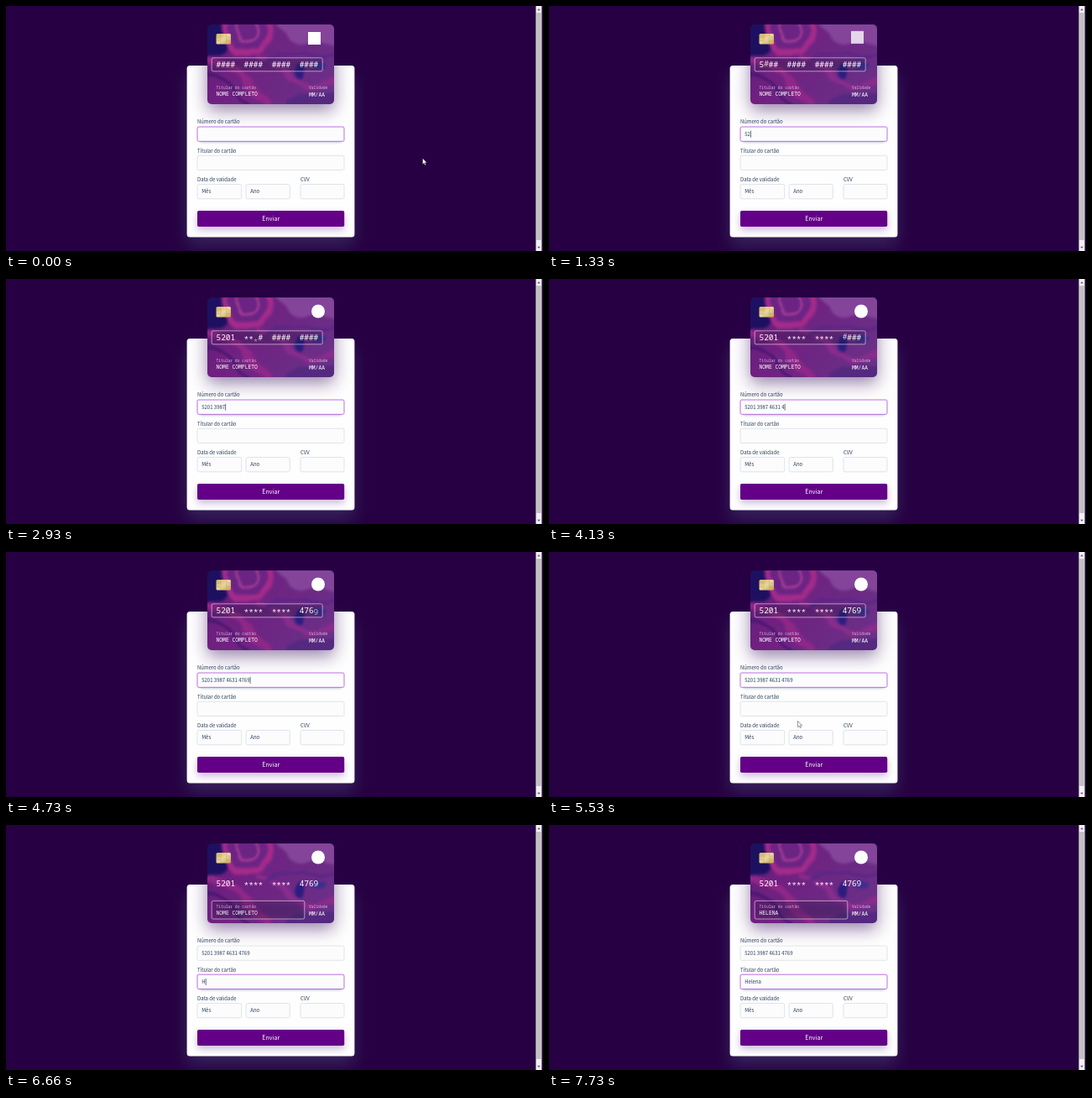
Animation of 640 by 292 pixels, one loop 8000 ms. Source, as an HTML page:

```html
<!DOCTYPE html>
<html lang="pt">
<head>
<meta charset="utf-8">
<title>Cartão</title>
<style>
html, body { margin: 0; width: 100%; height: 100%; overflow: hidden; background: #260042; }
svg { display: block; width: 100%; height: 100%; }
text { white-space: pre; }
.form { font: 6px "Noto Sans CJK JP", "Noto Sans CJK SC", "Noto Sans", sans-serif; fill: #273c5a; }
.mono { font: 500 6.34px "Noto Sans Mono", "DejaVu Sans Mono", monospace; fill: #fff; }
.mono .num { font-size: 9.5px; }
.mono .small { font-size: 4.66px; font-weight: 400; fill: #e9d9f2; fill-opacity: .8; }
.field { fill: #fcfcfd; stroke: #d9dde5; stroke-width: .8; }
</style>
</head>
<body>
<svg viewBox="0 0 640 292" xmlns="http://www.w3.org/2000/svg">
  <defs>
    <clipPath id="cardClip"><rect x="240" y="22" width="151" height="95" rx="5"/></clipPath>
    <clipPath id="formClip"><rect x="215.6" y="71" width="199.8" height="204.5" rx="3.5"/></clipPath>
    <clipPath id="focusClip"><rect id="focusArea" rx="1.8"/></clipPath>
    <linearGradient id="base" x2="1" y2=".4">
      <stop offset="0" stop-color="#4a1a70"/><stop offset=".4" stop-color="#702080"/>
      <stop offset="1" stop-color="#6a3088"/>
    </linearGradient>
    <linearGradient id="gold" x2="1" y2="1">
      <stop offset="0" stop-color="#cfb168"/><stop offset=".5" stop-color="#e8d79c"/><stop offset="1" stop-color="#c4a257"/>
    </linearGradient>
    <filter id="marble" filterUnits="userSpaceOnUse" x="220" y="4" width="190" height="132" color-interpolation-filters="sRGB">
      <feGaussianBlur in="SourceGraphic" stdDeviation=".8" result="soft"/>
      <feTurbulence type="fractalNoise" baseFrequency=".035" numOctaves="2" seed="8"/>
      <feDisplacementMap in="soft" scale="14" xChannelSelector="R" yChannelSelector="G"/>
      <feGaussianBlur stdDeviation=".8"/>
    </filter>
    <filter id="blur10" x="-40%" y="-40%" width="180%" height="180%"><feGaussianBlur stdDeviation="10"/></filter>
    <filter id="blur4" x="-20%" y="-80%" width="140%" height="260%"><feGaussianBlur stdDeviation="4"/></filter>
    <filter id="blur2" x="-10%" y="-60%" width="120%" height="220%"><feGaussianBlur stdDeviation="1.8"/></filter>
  </defs>

  <rect width="640" height="292" fill="#260042"/>

  <g id="scrollbar">
    <rect x="631.5" width="7" height="292" fill="#f1f1f1"/>
    <rect x="632.2" y="8" width="5.6" height="271" fill="#c1c1c1"/>
    <path d="M633.2 5.2L635 3L636.8 5.2ZM633.2 286.8L635 289L636.8 286.8Z" fill="#606060"/>
  </g>

  <rect x="215.6" y="81.5" width="199.8" height="204.5" rx="4" fill="#5a7494" opacity=".3" filter="url(#blur10)"/>
  <rect x="215.6" y="71" width="199.8" height="204.5" rx="3.5" fill="#fefefe"/>
  <g clip-path="url(#formClip)">
    <rect x="240" y="29" width="151" height="95" rx="5" fill="#421a66" opacity=".55" filter="url(#blur10)"/>
  </g>

  <g clip-path="url(#cardClip)">
    <g filter="url(#marble)" fill="none">
      <rect x="220" y="4" width="190" height="132" fill="url(#base)"/>
      <path d="M224 8H266C260 30 272 42 262 54S244 56 224 62Z" fill="#1d1060"/>
      <path d="M318 8C324 38 346 50 368 45S396 54 410 50V8Z" fill="#83449a"/>
      <path d="M330 136C328 112 350 100 370 104S400 92 410 90V136Z" fill="#54297f"/>
      <path d="M262 8C256 42 272 60 294 55S322 38 310 8" fill="#6b2484" stroke="#a42b8a" stroke-width="7"/>
      <path d="M276 8C272 38 282 46 292 42S304 26 296 8" stroke="#b8449a" stroke-width="2.5"/>
      <path d="M226 66C258 66 274 72 286 88S312 118 330 130" stroke="#8f2788" stroke-width="9"/>
      <path d="M226 78C254 78 264 92 276 106S296 128 306 134" stroke="#491670" stroke-width="4"/>
      <path d="M296 62C320 60 330 84 350 92S384 84 410 92" stroke="#8a2c8c" stroke-width="6"/>
      <path d="M308 66C330 48 350 66 410 58" stroke="#5a2684" stroke-width="4"/>
      <ellipse cx="350" cy="79" rx="6" ry="8" fill="#2b1d80"/>
      <ellipse cx="374" cy="72" rx="9" ry="5" fill="#3f2d8e"/>
    </g>
  </g>

  <g id="chip">
    <rect x="250.5" y="33" width="17.5" height="12.5" rx="1.6" fill="url(#gold)"/>
    <path d="M250.5 37H256V41.5H250.5M268 37H262.5V41.5H268M256 37V33M256 41.5V45.5M262.5 37V33M262.5 41.5V45.5" fill="none" stroke="#a27c31" stroke-opacity=".5" stroke-width=".4"/>
  </g>
  <rect id="markA" x="360" y="31" width="15" height="15" fill="#fff"/>
  <circle id="markB" cx="372" cy="38.5" r="8" fill="#fff"/>

  <g clip-path="url(#focusClip)"><rect id="focusShade" fill="#08142f" opacity=".25" filter="url(#blur4)"/></g>
  <rect id="focusBox" rx="1.8" fill="none" stroke="#fff" stroke-opacity=".65" stroke-width=".8"/>

  <g id="cardText" class="mono">
    <text class="small" x="250.5" y="99">Titular do cartão</text>
    <text class="small" x="361" y="99">Validade</text>
    <text x="361" y="108">MM/AA</text>
    <text id="namePlaceholder" x="250.5" y="107">NOME COMPLETO</text>
  </g>

  <g class="form">
    <text x="228" y="140.3">Número do cartão</text>
    <text x="228" y="174.7">Títular do cartão</text>
    <text x="228" y="208.9">Data de validade</text>
    <text x="351" y="208.9">CVV</text>
    <rect id="shadow1" x="231" y="151" width="169" height="11.5" rx="2" fill="#203875" filter="url(#blur2)"/>
    <rect id="shadow2" x="231" y="185.5" width="169" height="11.5" rx="2" fill="#203875" filter="url(#blur2)"/>
    <rect id="field1" class="field" x="228" y="144" width="175" height="17.3" rx="1.8"/>
    <rect id="field2" class="field" x="228" y="178.2" width="175" height="17.3" rx="1.8"/>
    <rect class="field" x="228" y="212.5" width="52.7" height="17.3" rx="1.8"/>
    <rect class="field" x="286" y="212.5" width="52.3" height="17.3" rx="1.8"/>
    <rect class="field" x="351" y="212.5" width="52" height="17.3" rx="1.8"/>
    <text id="value1" x="233.2" y="154.8"></text>
    <text id="value2" x="233.2" y="189.2"></text>
    <text x="233.2" y="223.2">Mês</text>
    <text x="291.3" y="223.2">Ano</text>
    <rect id="caret" width=".7" height="8" fill="#1a3b5d"/>
    <rect x="228" y="248" width="175" height="19" rx="2" fill="#5a1a8c" opacity=".3" filter="url(#blur4)"/>
    <rect x="228" y="244" width="175.2" height="19" rx="1.8" fill="#640087"/>
    <text x="315.7" y="256.2" font-size="7.1" text-anchor="middle" style="fill:#fff">Enviar</text>
  </g>

  <path id="pointer" d="M0 0V7.2L1.7 5.7L2.8 8.2L4 7.7L2.9 5.3H5.1Z" fill="#fff" stroke="#222" stroke-width=".45"/>
</svg>

<script>
const LOOP = 8000;
const NUMBER = "5201398746314769";
const NAME = "Helena";
const digitTimes = [110, 1250, 1640, 2000, 2290, 2490, 2705, 2905, 3130, 3330, 3530, 3740, 4045, 4190, 4335, 4480];
const letterTimes = [...NAME].map((_, i) => 6610 + 118 * i);
const CLICK = 6080;
const SHIFT = 5.3;
const numberBox = [245.2, 61.8, 132, 16];
const nameBox = [245.2, 90.4, 110.6, 21.6];
const pointerPath = [[5260, 496.5, 181.5], [5530, 296.5, 201.5], [5860, 290, 194]];

const $ = id => document.getElementById(id);
const clamp = x => Math.max(0, Math.min(1, x));
const mix = (a, b, p) => a + (b - a) * p;

function bezier(x1, y1, x2, y2) {
  const at = (a, b, u) => 3 * a * u * (1 - u) ** 2 + 3 * b * u * u * (1 - u) + u ** 3;
  return x => {
    if (x <= 0) return 0;
    if (x >= 1) return 1;
    let lo = 0, hi = 1;
    for (let i = 0; i < 20; i++) {
      const mid = (lo + hi) / 2;
      if (at(x1, x2, mid) < x) lo = mid; else hi = mid;
    }
    return at(y1, y2, lo);
  };
}
const ease = bezier(.25, .1, .25, 1);
const easeInOut = bezier(.42, 0, .58, 1);
const focusEase = bezier(.71, .03, .56, .85);
const leave = age => easeInOut(age / 250);
const enter = age => easeInOut((age - 100) / 250);

function set(el, attrs) {
  for (const key in attrs) el.setAttribute(key, attrs[key]);
}
function addText(x, y, str, cls = "") {
  const el = document.createElementNS("http://www.w3.org/2000/svg", "text");
  set(el, { x, y, class: cls });
  el.textContent = str;
  $("cardText").append(el);
  return el;
}
function slideOut(el, age) {
  const p = leave(age);
  set(el, { transform: `translate(0 ${-SHIFT * p})`, opacity: 1 - p });
}
function slideIn(el, age) {
  const p = enter(age);
  set(el, { transform: `translate(0 ${SHIFT * (1 - p)})`, opacity: p });
}

const digits = [...NUMBER].map((d, i) => {
  const group = i >> 2;
  const x = 250.5 + 5.63 * i + 10.55 * group;
  const hidden = group === 1 || group === 2;
  return {
    before: addText(x, 73.2, "#", "num"),
    after: addText(x, hidden ? 75 : 73.2, hidden ? "*" : d, "num")
  };
});
const letters = [...NAME.toUpperCase()].map((c, i) => addText(250.5 + 3.8 * i, 107, c));

const typed = (times, t) => times.filter(k => k <= t).length;

function drawCard(t) {
  digits.forEach((d, i) => {
    slideOut(d.before, t - digitTimes[i]);
    slideIn(d.after, t - digitTimes[i]);
  });
  slideOut($("markA"), t - digitTimes[1]);
  slideIn($("markB"), t - digitTimes[1]);
  slideOut($("namePlaceholder"), t - letterTimes[0]);
  letters.forEach((el, i) => {
    const p = enter(t - letterTimes[i]), q = 1 - p;
    set(el, { transform: `translate(${3.5 * q} 0) rotate(${45 * q} ${252.4 + 3.8 * i} 105)`, opacity: p });
  });

  const p = focusEase((t - CLICK) / 350);
  const [x, y, width, height] = numberBox.map((v, i) => mix(v, nameBox[i], p));
  for (const id of ["focusBox", "focusArea", "focusShade"]) set($(id), { x, y, width, height });
}

function drawForm(t) {
  const p = ease((t - CLICK) / 300);
  [1 - p, p].forEach((on, i) => {
    const tone = [[217, 170], [221, 76], [229, 216]].map(([a, b]) => Math.round(mix(a, b, on)));
    $("field" + (i + 1)).style.stroke = `rgb(${tone})`;
    set($("shadow" + (i + 1)), { opacity: .3 * on });
  });
  $("value1").textContent = NUMBER.slice(0, typed(digitTimes, t)).replace(/(.{4})(?=.)/g, "$1 ");
  $("value2").textContent = NAME.slice(0, typed(letterTimes, t));

  // The caret blinks from 200 ms on and restarts with every key or click.
  const last = Math.max(...[200, ...digitTimes.slice(1), CLICK, ...letterTimes].filter(k => k <= t));
  const value = t < CLICK ? $("value1") : $("value2");
  const width = value.textContent ? value.getComputedTextLength() : 0;
  set($("caret"), {
    x: 233.4 + width,
    y: t < CLICK ? 148.7 : 183,
    opacity: t >= digitTimes[0] && (t < 200 || (t - last) % 1060 < 530) ? 1 : 0
  });
}

// Typing hides the pointer until the mouse moves again.
function drawPointer(t) {
  const [a, b, c] = pointerPath;
  const [from, to] = t < b[0] ? [a, b] : [b, c];
  const p = clamp((t - from[0]) / (to[0] - from[0]));
  const shown = t < digitTimes[0] || (t >= a[0] + 50 && t < c[0]);
  set($("pointer"), {
    transform: `translate(${mix(from[1], to[1], p)} ${mix(from[2], to[2], p)})`,
    opacity: shown ? 1 : 0
  });
}

function draw(t) {
  drawCard(t);
  drawForm(t);
  drawPointer(t);
}

let start;
function tick(now) {
  start ??= now;
  draw((now - start) % LOOP);
  requestAnimationFrame(tick);
}
draw(0);
requestAnimationFrame(tick);
</script>
</body>
</html>
```
